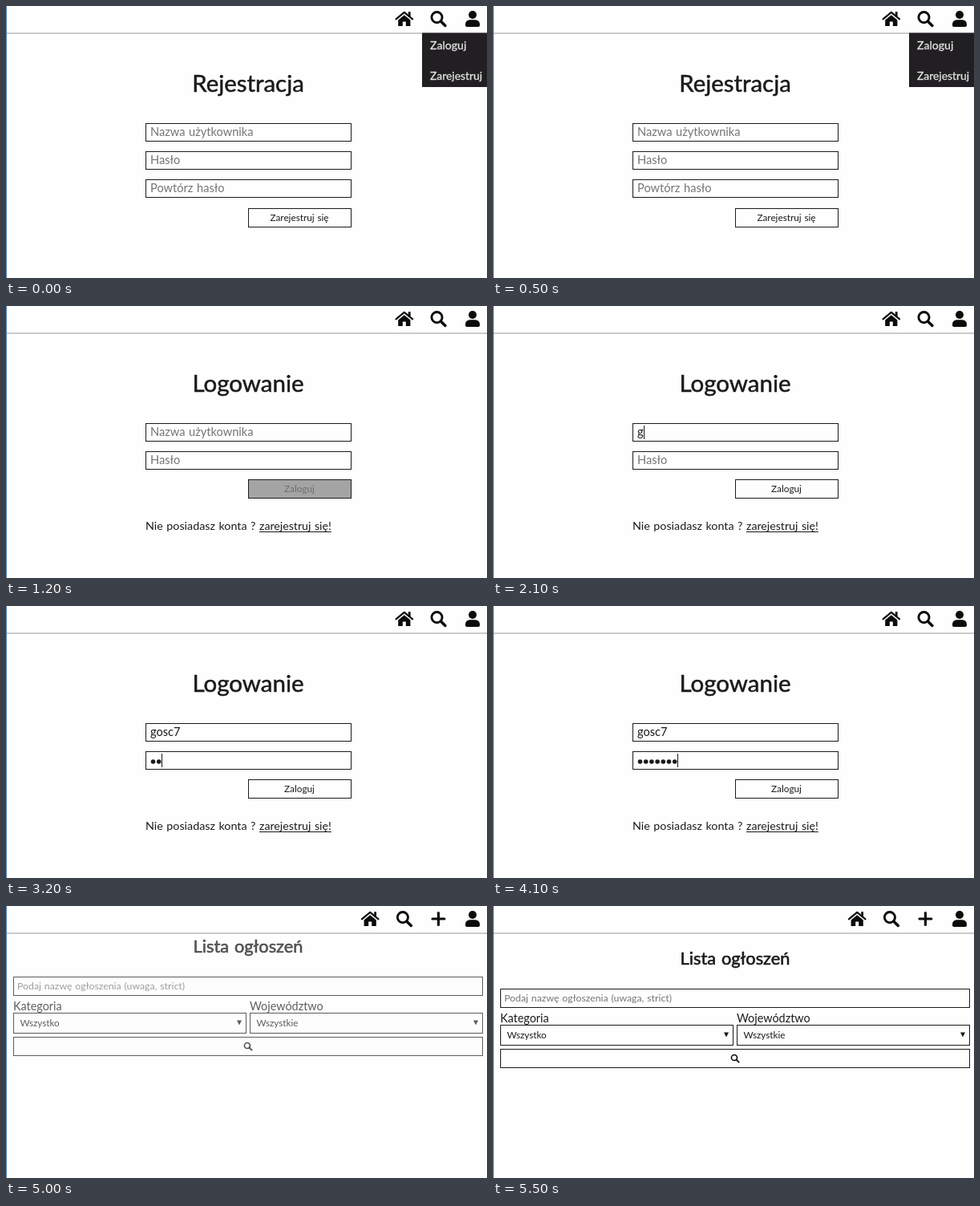
Animation of 600 by 339 pixels, one loop 5600 ms. Source, as an HTML page with a canvas:

```html
<!DOCTYPE html>
<html lang="pl">
<head>
<meta charset="utf-8">
<title>Logowanie</title>
<style>
html, body { margin: 0; height: 100%; overflow: hidden; background: #fefefe; }
canvas { display: block; }
</style>
</head>
<body>
<canvas id="stage" width="600" height="339"></canvas>
<script>
const c = document.getElementById('stage').getContext('2d');
const LOOP = 5600, INK = '#1b1a1c', HINT = '#757575', PAPER = '#fefefe';
const LEAVE = 400, ENTER = 280, SHIFT = 50;
const TO_LOGIN = 514, TO_LIST = 4484, SUBMIT = 4450;
const LOGIN = 'gosc7';
const LOGIN_KEYS = [2000, 2200, 2300, 2500, 2700];
const PASS_KEYS = [3100, 3200, 3400, 3500, 3700, 3900, 4100];

// cubic-bezier(.25, .1, .25, 1)
function ease(x) {
  if (x <= 0) return 0;
  if (x >= 1) return 1;
  const curve = (s, a, b) => 3 * s * (1 - s) ** 2 * a + 3 * s * s * (1 - s) * b + s ** 3;
  let lo = 0, hi = 1;
  for (let i = 0; i < 20; i++) {
    const mid = (lo + hi) / 2;
    if (curve(mid, .25, .25) < x) lo = mid; else hi = mid;
  }
  return curve(lo, .1, 1);
}

function text(str, x, y, size, color = INK, align = 'left', bold = 0) {
  c.font = `${size}px Lato, "Open Sans", sans-serif`;
  c.wordSpacing = size * .06 + 'px';
  c.textAlign = align;
  c.fillStyle = c.strokeStyle = color;
  c.fillText(str, x, y);
  if (bold) {
    c.lineWidth = bold;
    c.strokeText(str, x, y);
  }
  return c.measureText(str).width;
}

function box(x, y, w, h, fill = PAPER) {
  c.fillStyle = fill;
  c.fillRect(x, y, w, h);
  c.strokeStyle = INK;
  c.lineWidth = 1;
  c.strokeRect(x + .5, y + .5, w, h);
}

function line(width, ...pts) {
  c.lineWidth = width;
  c.beginPath();
  pts.forEach(([x, y]) => c.lineTo(x, y));
  c.stroke();
}

function poly(...pts) {
  c.beginPath();
  pts.forEach(([x, y]) => c.lineTo(x, y));
  c.fill();
}

function disc(x, y, r) {
  c.beginPath();
  c.arc(x, y, r, 0, 7);
  c.fill();
}

const icons = {
  home() {
    line(2.2, [-10.3, .4], [0, -8.2], [10.3, .4]);
    c.fillRect(5, -8.8, 2.8, 6);
    poly([-7.6, 1.6], [0, -4.7], [7.6, 1.6], [7.6, 9], [2, 9], [2, 3.4], [-2, 3.4], [-2, 9], [-7.6, 9]);
  },
  search() {
    c.beginPath();
    c.arc(-1.9, -1.9, 6.6, 0, 7);
    c.lineWidth = 2.9;
    c.stroke();
    line(3.5, [3.4, 3.4], [8.5, 8.5]);
  },
  plus() {
    line(3.2, [-7.4, 0], [7.4, 0]);
    line(3.2, [0, -7.4], [0, 7.4]);
  },
  user() {
    disc(0, -5, 5);
    c.beginPath();
    c.roundRect(-9, 1.2, 18, 8.8, [5.5, 5.5, 2, 2]);
    c.fill();
  }
};

function icon(name, x, y, scale = 1) {
  c.save();
  c.translate(x, y);
  c.scale(scale, scale);
  c.fillStyle = c.strokeStyle = '#0c0c0d';
  c.lineCap = c.lineJoin = 'round';
  icons[name]();
  c.restore();
}

function caret(x, y) {
  c.fillStyle = INK;
  c.fillRect(Math.round(x), y, 1, 17);
}

function input(y, hint, filled) {
  box(174, y, 256, 22);
  if (!filled) text(hint, 180, y + 16, 14.6, HINT);
}

function button(y, label, fill, color) {
  box(302, y, 128, 23, fill);
  text(label, 366, y + 16, 11.8, color, 'center');
}

function registerPage() {
  text('Rejestracja', 302, 107, 29.4, INK, 'center', .5);
  input(146, 'Nazwa użytkownika');
  input(181, 'Hasło');
  input(216, 'Powtórz hasło');
  button(252, 'Zarejestruj się');
}

function loginPage(t) {
  const typed = keys => t < SUBMIT ? keys.filter(k => t >= k).length : 0;
  const name = LOGIN.slice(0, typed(LOGIN_KEYS)), dots = typed(PASS_KEYS);

  text('Logowanie', 302, 107, 29.5, INK, 'center', .5);
  input(146, 'Nazwa użytkownika', name);
  const nameWidth = text(name, 180, 162, 14.6);
  if (t >= 1500 && t < 3000) caret(180 + nameWidth, 149);

  input(181, 'Hasło', dots);
  c.fillStyle = INK;
  for (let i = 0; i < dots; i++) disc(183.5 + i * 7.2, 194, 2.8);
  if (t >= 3000) caret(180 + dots * 7.2, 184);

  const p = ease((t - 1126) / 200);
  const grey = v => `rgb(${v},${v},${v})`;
  button(216, 'Zaloguj', grey(254 * p), grey(254 - 227 * p));

  text('Nie posiadasz konta ?', 174, 279, 14.3);
  const w = text('zarejestruj się!', 316, 279, 14.2);
  c.fillRect(316, 281, w, 1);
}

function select(x, label, value) {
  text(label, x, 145, 14.4);
  box(x, 148, 290, 25);
  text(value, x + 8.5, 165, 11.7);
  c.fillStyle = INK;
  poly([x + 279, 157.5], [x + 285, 157.5], [x + 282, 163.5]);
}

function listPage() {
  text('Lista ogłoszeń', 302, 73, 21.8, INK, 'center', .6);
  box(9, 103, 585, 23);
  text('Podaj nazwę ogłoszenia (uwaga, strict)', 14, 119, 12.3, HINT);
  select(9, 'Kategoria', 'Wszystko');
  select(304, 'Województwo', 'Wszystkie');
  box(9, 178, 585, 23);
  icon('search', 302, 190, .54);
}

// Pages drop away downwards and arrive from above, on whole pixels.
function page(draw, t, enter, leave) {
  const arrived = ease((t - enter) / ENTER), left = ease((t - leave) / LEAVE);
  const alpha = arrived * (1 - left) ** 1.3;
  if (!alpha) return;
  c.save();
  c.globalAlpha = alpha;
  c.translate(0, Math.round(SHIFT * (left - 1 + arrived)));
  draw(t);
  c.restore();
}

function header(t) {
  c.fillStyle = '#97999b';
  c.fillRect(0, 33.5, 600, 1);
  const names = t < SUBMIT ? ['home', 'search', 'user'] : ['home', 'search', 'plus', 'user'];
  names.reverse().forEach((name, i) => icon(name, 582 - i * 42.6, 16));

  const x = Math.round(519 + 81 * ease((t - TO_LOGIN) / LEAVE));
  c.fillStyle = '#211f21';
  c.fillRect(x, 33.5, 81, 67.5);
  text('Zaloguj', x + 10, 53.5, 14.1, '#e4e4e4', 'left', .3);
  text('Zarejestruj', x + 10, 91.5, 13.9, '#e4e4e4', 'left', .3);
}

function frame(now) {
  const t = now % LOOP;
  c.fillStyle = PAPER;
  c.fillRect(0, 0, 600, 339);
  page(registerPage, t, -ENTER, TO_LOGIN);
  page(loginPage, t, TO_LOGIN + LEAVE, TO_LIST);
  page(listPage, t, TO_LIST + LEAVE, LOOP);
  header(t);
  c.fillStyle = '#4d86b8';
  c.fillRect(0, 0, 1, 339);
  requestAnimationFrame(frame);
}
requestAnimationFrame(frame);
</script>
</body>
</html>
```
